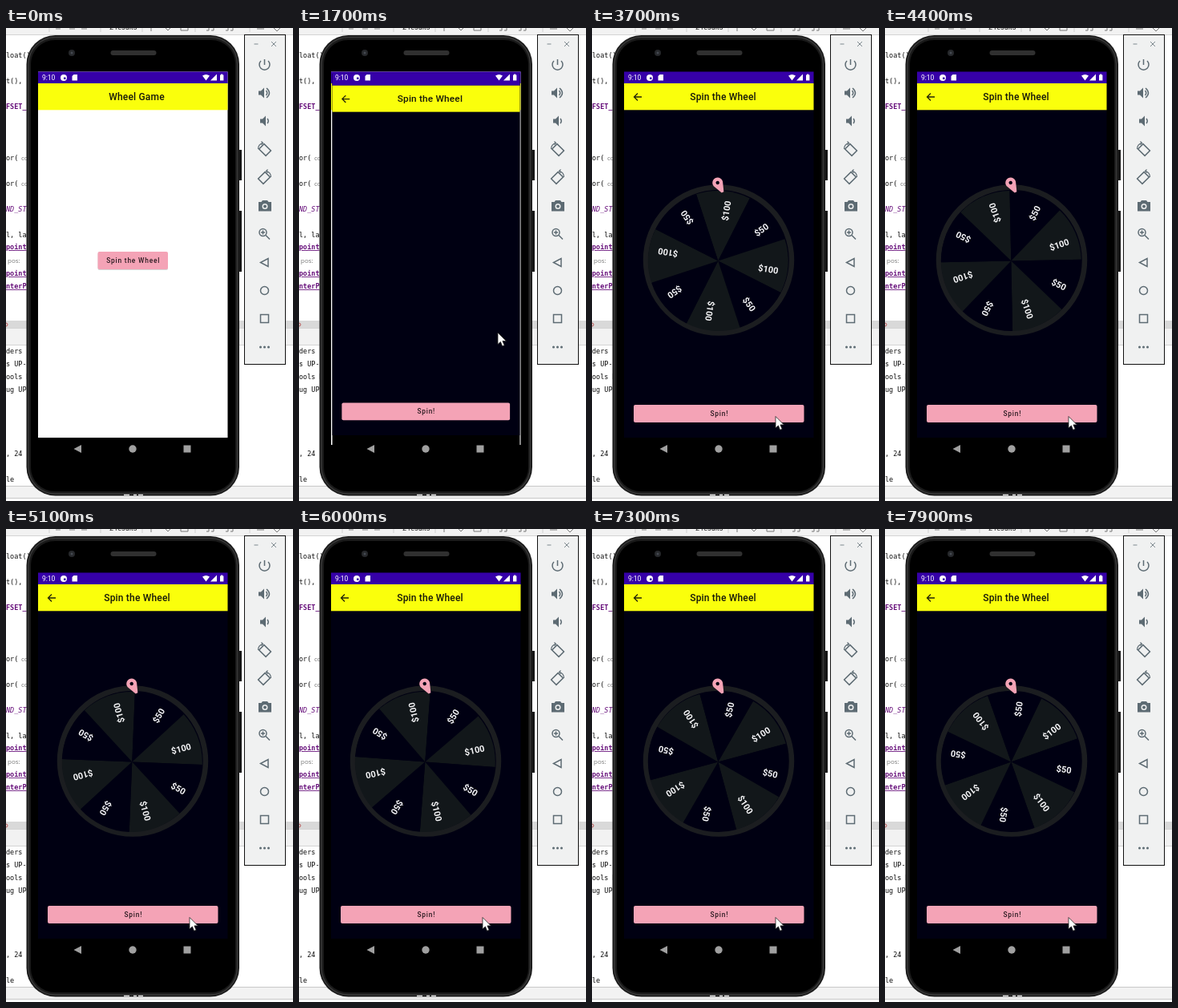
An HTML page for the animation above (8000 ms loop, 358 px wide and 590 px high).

```html
<!DOCTYPE html>
<html lang="en">
<head>
<meta charset="utf-8">
<title>Wheel Game</title>
<style>
html, body { margin: 0; width: 100%; height: 100%; overflow: hidden; background: #fff; }
svg { display: block; width: 358px; height: 590px; }
text { font-family: Roboto, sans-serif; white-space: pre; }
.mono text { font: 8.5px "DejaVu Sans Mono", monospace; fill: #111; }
.mono .id { fill: #660e7a; font-weight: bold; }
.mono .link { text-decoration: underline; }
.mono .const { fill: #660e7a; font-style: italic; }
.mono .hint { fill: #777; font: 8px "Open Sans", sans-serif; }
.title { font-size: 12px; font-weight: 500; letter-spacing: .18px; text-anchor: middle; fill: #16180a; }
.btn { font-size: 8.4px; font-weight: 500; letter-spacing: .8px; text-anchor: middle; fill: #2a1a20; }
.prize { font-size: 11px; font-weight: 700; text-anchor: end; fill: #f4f4f6; }
.line { fill: none; stroke: #5d6b73; stroke-width: 1.5; }
.solid { fill: #5d6b73; }
</style>
</head>
<body>
<svg viewBox="0 0 358 590">
  <!-- editor behind the phone -->
  <rect width="358" height="590" fill="#fff"/>
  <rect width="358" height="8" fill="#f2f2f2"/>
  <path d="M0 8.5H358" stroke="#d4d4d4"/>
  <text x="129" y="2" font-size="9" fill="#222">2 results</text>
  <path d="M54 0V5M118 0V5M170 0V5M236 0V5M304 0V5" stroke="#d0d0d0"/>
  <path d="M62 1h6M79 1h7M94 1h7" stroke="#bbb" stroke-width="2"/>
  <path d="M181 0v4M199 0l3 3 3-3M218 0v3h9V0M250 3h3V0M256 3h3V0M274 3h3V0M280 3h3V0M313 1h9M334 0l4 4 4-4" fill="none" stroke="#777"/>
  <rect y="365" width="358" height="9" fill="#d9d9d9"/>
  <rect y="374" width="358" height="22" fill="#f2f2f2"/>
  <path d="M0 374.5H358M0 395.5H358" stroke="#d4d4d4"/>
  <rect y="571" width="358" height="15" fill="#f2f2f2"/>
  <path d="M0 571.5H358M0 586.5H358" stroke="#c8c8c8"/>
  <g class="mono" id="code"></g>

  <!-- phone -->
  <path d="M290 152h4v38h-4zM290 228h4v76h-4z" fill="#151515"/>
  <rect x="25.500" y="9" width="265.500" height="574.500" rx="36" fill="#1a1a1a"/>
  <rect x="28" y="11.500" width="260.500" height="569.500" rx="33.500" fill="none" stroke="#383838" stroke-width="1.500"/>
  <rect x="31" y="15" width="255" height="563" rx="30" fill="#000"/>
  <circle cx="82" cy="31" r="4" fill="#26282b"/><circle cx="82" cy="31" r="1.500" fill="#454a52"/>
  <rect x="130.500" y="28" width="57" height="6" rx="3" fill="#303030"/>
  <path d="M147 582.500h7M159 582.500h4M165 582.500h6" stroke="#e8e8e8" stroke-width="1.400"/>

  <clipPath id="screen"><rect x="40" y="54.500" width="236.500" height="466"/></clipPath>
  <g clip-path="url(#screen)">
    <g id="home">
      <rect id="homeBg" x="40" y="54" width="237" height="457" fill="#fff"/>
      <rect x="40" y="54" width="237" height="15" fill="#3600a8"/>
      <rect x="40" y="69" width="237" height="33.300" fill="#faff0c"/>
      <text class="title" x="163" y="90">Wheel Game</text>
      <rect x="114.500" y="280" width="87.500" height="22" rx="2" fill="#bbb" opacity=".6"/>
      <rect x="114.500" y="279" width="87.500" height="22" rx="2" fill="#f4a3b6"/>
      <text class="btn" x="158.700" y="293">Spin the Wheel</text>
    </g>
    <g id="game">
      <rect x="40" y="54" width="237" height="480"/>
      <rect x="40" y="54" width="237" height="457" fill="#000012"/>
      <rect x="40" y="54" width="237" height="15" fill="#3600a8"/>
      <rect x="40" y="69" width="237" height="33.300" fill="#faff0c"/>
      <path d="M62 86H53M57 81.500L52.500 86 57 90.500" fill="none" stroke="#222408" stroke-width="1.300"/>
      <text class="title" x="163.500" y="90">Spin the Wheel</text>
      <rect x="52" y="470" width="212.500" height="22" rx="2" fill="#f4a3b6"/>
      <text class="btn" x="158.800" y="484">Spin!</text>
      <g id="board">
        <circle cx="158" cy="289.500" r="91" fill="#000012" stroke="#1b1d20" stroke-width="6.500"/>
        <g transform="translate(157.300 290.500)"><g id="wheel"></g></g>
        <path transform="translate(156.700 193) rotate(-28)" fill="#f4a3b6" fill-rule="evenodd"
          d="M-1.500 13.500L-5.800 3A6.500 6.500 0 1 1 5.800 3L1.500 13.500zM2.200 0A2.200 2.200 0 1 0-2.200 0 2.200 2.200 0 1 0 2.200 0Z"/>
      </g>
    </g>
    <g fill="#fff">
      <text x="45" y="65" font-size="8.500">9:10</text>
      <circle cx="72" cy="62" r="4"/>
      <rect x="72" y="61.500" width="2.500" height="2.500" fill="#3600a8"/>
      <path d="M84.500 58H89v7.500H82.500V60z"/>
      <path d="M245 59.500Q249.500 56.500 254 59.500L249.500 65.500zM263 57.500v8h-8zM267 58.500h1.200v-1h2v1h1.200v7H267z"/>
    </g>
  </g>
  <g fill="#a0a0a0">
    <path d="M94 520V530L84.500 525z"/><circle cx="158" cy="525" r="4.700"/><rect x="221.500" y="520.500" width="9" height="9"/>
  </g>

  <!-- emulator panel -->
  <rect x="297.500" y="8.500" width="51" height="411" fill="#f0f1f1" stroke="#111"/>
  <path d="M309.500 20h5M331 17l6 6M337 17l-6 6" stroke="#7d888e" fill="none"/>
  <g class="line">
    <path d="M322.500 39v7M318 41a6.500 6.500 0 1 0 9 0"/>
    <path d="M324.500 78q2.500 3 0 6M325 75q7 6 0 12M326 113q2.500 3 0 6"/>
    <g id="turn">
      <rect x="-4.500" y="-6" width="9" height="12" transform="translate(1 1) rotate(-45)"/>
      <path d="M-7.500 0Q-7.500-6-1.500-7.500M-3.500-9.500L-1.500-7.500-3.500-5.500" stroke-width="1.200"/>
    </g>
    <use href="#turn" id="turnBack"/>
    <circle cx="320.500" cy="255" r="4.500"/><path d="M324 258.500l5 5M318 255h5M320.500 252.500v5"/>
    <path d="M327 287.500v10l-9.500-5z"/><circle cx="322.500" cy="327.500" r="5"/><rect x="317.500" y="357.500" width="10" height="10"/>
  </g>
  <g class="solid">
    <path d="M315 78.500h3l4-4v13l-4-4h-3zM317 113.500h3l4-4v13l-4-4h-3z"/>
    <path fill-rule="evenodd" d="M315 217h3.500l1.500-2h6l1.500 2h3.500v11.500h-16zM326.500 222.500a3.500 3.500 0 1 0-7 0 3.500 3.500 0 1 0 7 0z"/>
    <circle cx="323" cy="222.500" r="2"/>
    <circle cx="317.500" cy="398" r="1.500"/><circle cx="322.500" cy="398" r="1.500"/><circle cx="327.500" cy="398" r="1.500"/>
  </g>

  <path id="cursor" d="M0 0V14.500L3.400 11.400 5.600 16.800 8.200 15.700 5.900 10.400H10.400z" fill="#fff" stroke="#222" stroke-width=".8"/>
</svg>
<script>
const $ = id => document.getElementById(id);
const clamp = x => Math.min(1, Math.max(0, x));

const code = [
  [37, "loat()"], [69, "t(),"], [101, "FSET_", "id"], [165, "or("], [165, "co", "hint", 19],
  [197, "or("], [197, "co", "hint", 19], [229, "ND_ST", "const"], [261, "l, la"],
  [276, "point", "id link"], [293, "pos:", "hint", 2], [309, "point", "id link"], [325, "nterP", "id link"],
  [406, "ders"], [422, "s UP-"], [438, "ools M"], [454, "ug UP"], [534, ", 24"], [566, "le"]
];
$("code").innerHTML = code.map(([y, s, cls = "", x = 0]) =>
  `<text x="${x}" y="${y}" class="${cls}">${s}</text>`).join("") +
  '<circle cx="0" cy="370" r="2" fill="none" stroke="#b55"/>';

$("turn").setAttribute("transform", "translate(322 151)");
$("turnBack").setAttribute("transform", "translate(645 35) scale(-1 1)");

// Labels lie along the radius, a little ahead of the middle of their slice.
const RADIUS = 87.5, LEAD = 5;
let slices = "";
for (let i = 0; i < 8; i++) {
  const big = i % 2 === 0, a = 22.5 * Math.PI / 180;
  const x = RADIUS * Math.cos(a), y = RADIUS * Math.sin(a);
  slices += `<g transform="rotate(${i * 45 - 90})">` +
    `<path d="M0 0L${x} ${-y}A${RADIUS} ${RADIUS} 0 0 1 ${x} ${y}Z" fill="${big ? "#12171a" : "#000012"}"/>` +
    `<text class="prize" transform="rotate(${LEAD})" x="76" y="4">${big ? "$100" : "$50"}</text></g>`;
}
$("wheel").innerHTML = slices;

// [time, label angle]: a fast spin that slows down
const spin = [[3000, -737.5], [3700, 8.3], [5100, 1334], [6000, 2056], [6700, 2550], [7900, 3292.5]];
const rate = i => (spin[i + 1][1] - spin[i][1]) / (spin[i + 1][0] - spin[i][0]);
function speed(i) {
  const last = spin.length - 1;
  if (i === 0) return 1.12;
  if (i === last) return 0.57;
  const before = spin[i][0] - spin[i - 1][0], after = spin[i + 1][0] - spin[i][0];
  return (rate(i - 1) * after + rate(i) * before) / (before + after);
}
function wheelAngle(t) {
  if (t <= spin[0][0]) return spin[0][1];
  let i = 0;
  while (i < spin.length - 2 && t > spin[i + 1][0]) i++;
  const [t0, a] = spin[i], [t1, b] = spin[i + 1], d = t1 - t0;
  if (t > t1) return b + speed(i + 1) * (t - t1);
  const u = (t - t0) / d, v = 1 - u;
  return v * v * (1 + 2 * u) * a + u * u * (3 - 2 * u) * b +
    d * u * v * (v * speed(i) - u * speed(i + 1));
}

const moves = [[300, 298, 417], [700, 165, 290], [1300, 165, 290], [1700, 248, 380], [2200, 229, 484.5]];
function cursorAt(t) {
  let i = 0;
  while (i < moves.length - 2 && t > moves[i + 1][0]) i++;
  const [t0, x0, y0] = moves[i], [t1, x1, y1] = moves[i + 1];
  let u = clamp((t - t0) / (t1 - t0));
  u = u * u * (3 - 2 * u);
  return [x0 + (x1 - x0) * u, y0 + (y1 - y0) * u];
}

const show = (id, on) => $(id).setAttribute("visibility", on ? "inherit" : "hidden");
const OPEN = 1500, OPEN_TIME = 400, WHEEL_SHOWN = 1900;

function draw(t) {
  const u = clamp((t - OPEN) / OPEN_TIME), scale = 1 - 0.15 * (1 - u) ** 3.5;
  $("game").setAttribute("transform", `translate(158 282) scale(${scale}) translate(-158 -282)`);
  $("game").setAttribute("opacity", clamp((t - OPEN + 50) / 100));
  $("homeBg").setAttribute("height", t > OPEN && u < 1 ? 466 : 457);
  show("game", t >= OPEN);
  show("home", u < 1);
  show("board", t >= WHEEL_SHOWN);
  $("wheel").setAttribute("transform", `rotate(${wheelAngle(t) - LEAD})`);
  show("cursor", t >= 300);
  $("cursor").setAttribute("transform", `translate(${cursorAt(t)})`);
}

function loop() {
  draw(performance.now() % 8000);
  requestAnimationFrame(loop);
}
loop();
</script>
</body>
</html>
```
